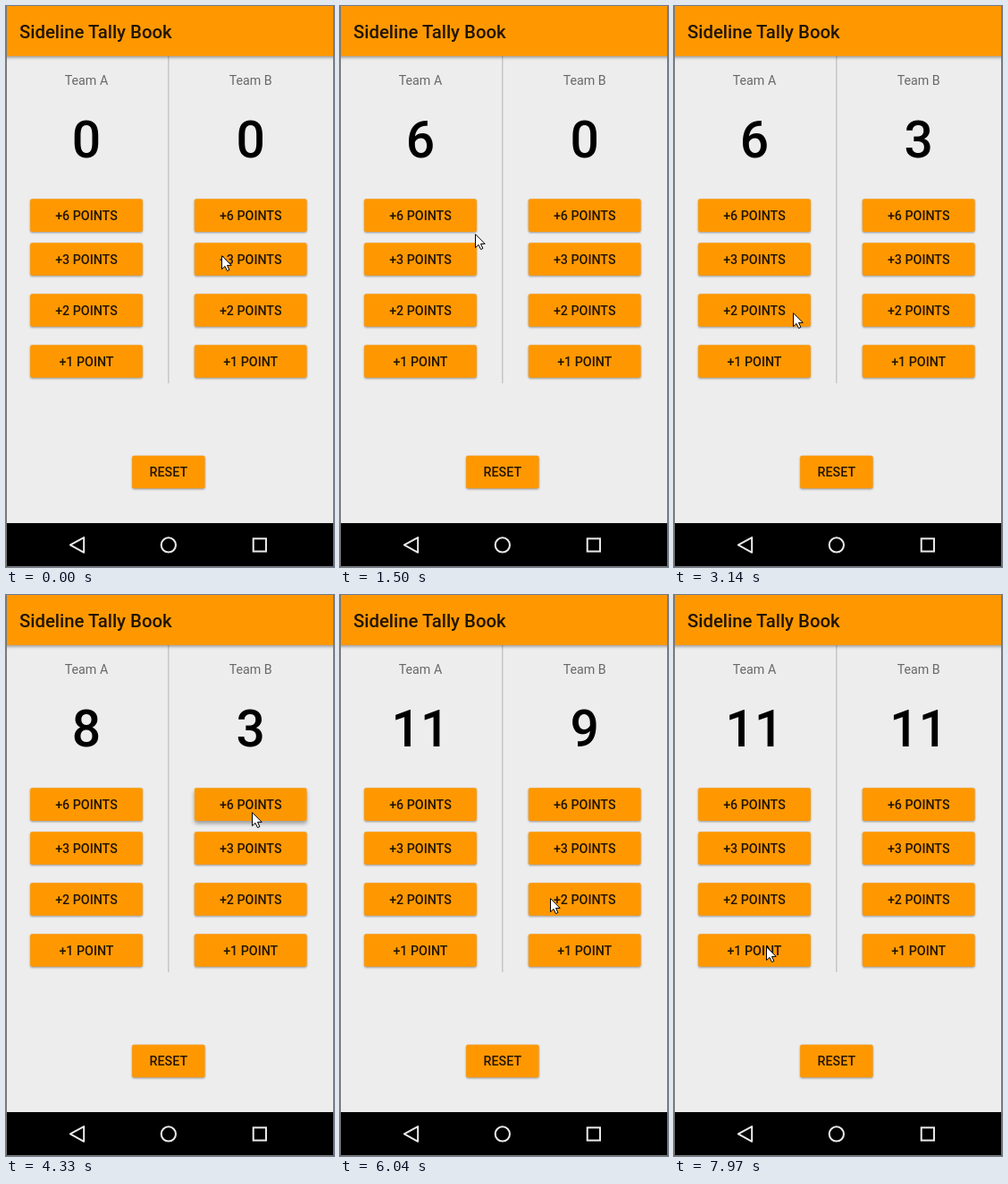
Animation of 367 by 626 pixels, one loop 8000 ms. Source, as an HTML page:

```html
<!DOCTYPE html>
<html lang="en">
<head>
<meta charset="utf-8">
<title>Score keeper</title>
<style>
  html, body { margin: 0; width: 100%; height: 100%; overflow: hidden; background: #ededed; }
  svg { display: block; width: 367px; height: 626px; font-family: Roboto, sans-serif; }
  text { fill: #000; fill-opacity: .87; }
  .title { font-size: 20px; font-weight: 500; }
  .team { font-size: 14px; fill-opacity: .56; text-anchor: middle; }
  .score { font-size: 56px; font-weight: 500; fill-opacity: 1; text-anchor: middle; }
  .label { font-size: 14px; font-weight: 500; text-anchor: middle; }
  .button { fill: #ff9800; filter: drop-shadow(0 1px .8px rgba(0, 0, 0, .38)); }
  .raised { fill: #fc9700; filter: drop-shadow(0 3px 2px rgba(0, 0, 0, .34)); }
  .bar { fill: #ff9800; filter: drop-shadow(0 2px 1.6px rgba(0, 0, 0, .32)); }
  .nav { fill: none; stroke: #e8e8e8; stroke-width: 2; }
</style>
</head>
<body>
<svg viewBox="0 0 367 626">
  <rect width="367" height="626" fill="#ededed"/>
  <!-- Phone screen, laid out in 360dp units -->
  <g transform="translate(-1.4 -1.2) scale(1.018)">
    <rect x="179.5" y="56" width="1" height="358.7" fill="#b4b4b4"/>
    <rect class="bar" width="364" height="56"/>
    <text class="title" x="16" y="36.4">Sideline Tally Book</text>
    <g id="teams"></g>
    <rect y="568" width="364" height="50"/>
    <g class="nav">
      <path d="M72 592L87 583.8V600.2Z" stroke-linejoin="round"/>
      <circle cx="180" cy="592" r="8"/>
      <rect x="273.2" y="585" width="14" height="14"/>
    </g>
  </g>
  <path d="M.5 0V625.5H366.5V0" fill="none" stroke="#777"/>
  <path id="cursor" fill="#fff" stroke="#000" d="M.5 .7V15.6L4 12.4L6.5 17.6L8.9 16.5L6.5 11.4H11.2Z"/>
</svg>
<script>
const LOOP = 8000;
const FRAME = 135;
const PRESS_LEAD = 160;
const COLUMN = 180.5;

const byId = id => document.getElementById(id);
const add = markup => byId('teams').insertAdjacentHTML('beforeend', markup);

function addButton(id, left, top, width, label) {
  add(`<rect id="${id}" class="button" x="${left}" y="${top}" width="${width}" height="36" rx="2"/>
       <text class="label" x="${left + width / 2}" y="${top + 23.1}">${label}</text>`);
}

['A', 'B'].forEach((team, column) => {
  const left = column * COLUMN;
  add(`<text class="team" x="${left + 89.75}" y="87.6">Team ${team}</text>
       <text class="score" id="score${team}" x="${left + 89.75}" y="167.2">0</text>`);
  [6, 3, 2, 1].forEach((points, row) => {
    const top = 212.7 + row * 56 - (row ? 8 : 0);
    addButton(team + points, left + 28, top, 123.5, `+${points} POINT${points > 1 ? 'S' : ''}`);
  });
});
addButton('reset', 140, 494, 80, 'RESET');

// Each visit moves the pointer to a button and clicks it; the next departure releases it.
const start = { x: 241, y: 278 };
const visits = [
  { button: 'A6', depart: 250, arrive: 670, click: 1230, x: 101, y: 236 },
  { button: 'B3', depart: 1380, arrive: 1890, click: 2480, x: 239, y: 285 },
  { button: 'A2', depart: 2620, arrive: 2980, click: 3520, x: 133, y: 342 },
  { button: 'B6', depart: 3640, arrive: 4060, click: 4450, x: 275, y: 242 },
  { button: 'A3', depart: 4570, arrive: 4840, click: 5640, x: 106, y: 275 },
  { button: 'B2', depart: 5760, arrive: 6040, click: 7150, x: 235, y: 338 },
  { button: 'A1', depart: 7270, arrive: 7540, click: Infinity, x: 103, y: 392 }
];

// Decelerating move shown in whole frames; the first step shows at departure.
function moveProgress({ depart, arrive }, time) {
  if (time < depart) return 0;
  const gaps = Math.round((arrive - depart) / FRAME);
  const step = Math.floor((time - depart) / (arrive - depart) * gaps) + 1;
  const u = Math.min(1, step / (gaps + 1));
  return u * (2 - u);
}

function draw(time) {
  let { x, y } = start;
  const scores = { A: 0, B: 0 };
  visits.forEach((visit, i) => {
    const progress = moveProgress(visit, time);
    x += (visit.x - x) * progress;
    y += (visit.y - y) * progress;

    const [team, points] = visit.button;
    if (time >= visit.click) scores[team] += Number(points);

    const release = visits[i + 1]?.depart ?? LOOP;
    const raised = time >= visit.click - PRESS_LEAD && time < release;
    byId(visit.button).classList.toggle('raised', raised);
  });
  byId('cursor').setAttribute('transform', `translate(${Math.round(x)} ${Math.round(y)})`);
  for (const team in scores) byId('score' + team).textContent = scores[team];
}

const begin = performance.now();
function tick() {
  draw((performance.now() - begin) % LOOP);
  requestAnimationFrame(tick);
}
tick();
</script>
</body>
</html>
```
